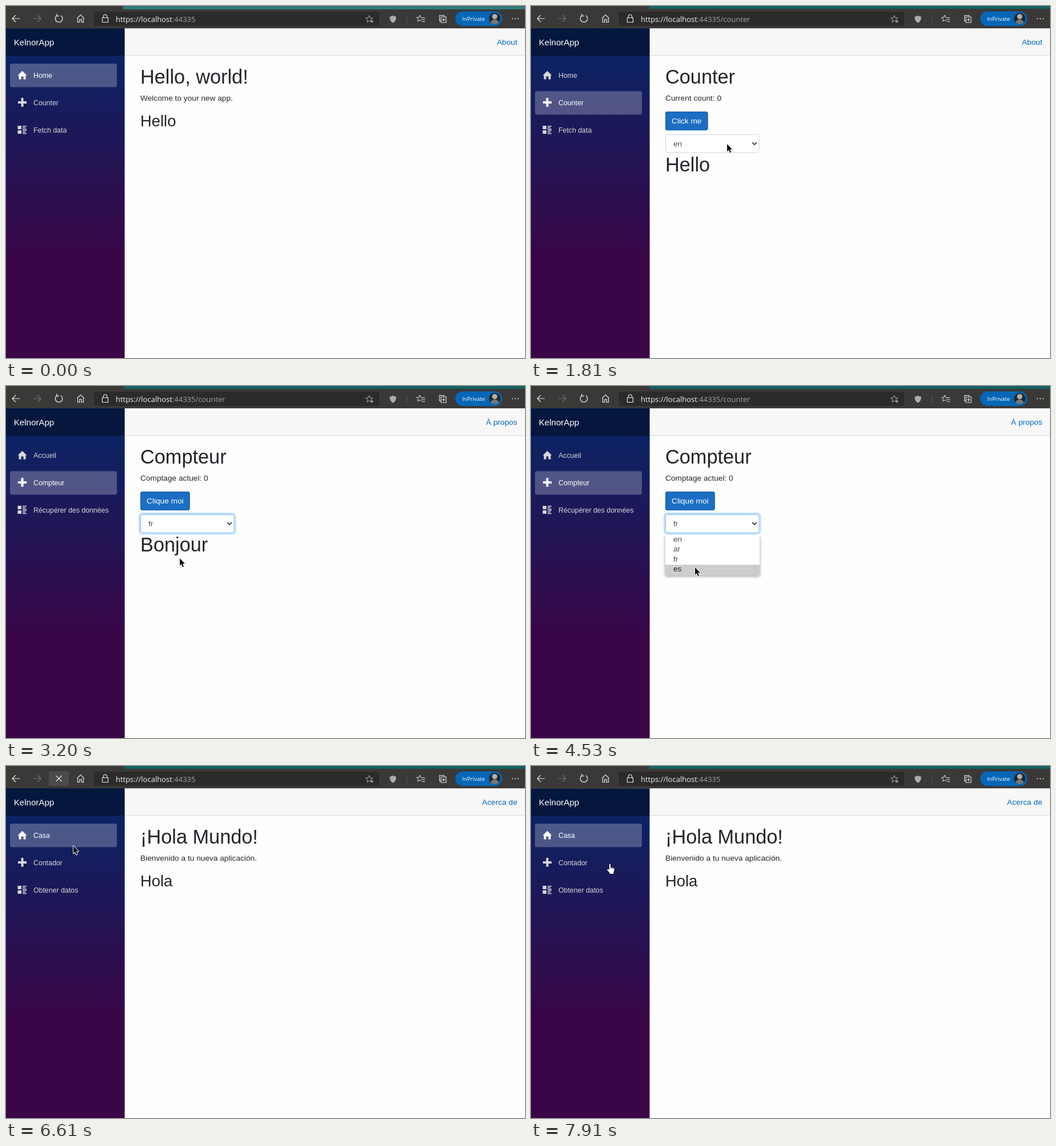
An HTML page with a canvas that plays this animation: 908x617 px, repeating every 7.99 s.

```html
<!DOCTYPE html>
<html lang="en">
<head>
<meta charset="utf-8">
<title>Language switch demo</title>
<style>
html, body { margin: 0; width: 100%; height: 100%; overflow: hidden; background: #fff; }
canvas { display: block; width: 908px; height: 617px; }
</style>
</head>
<body>
<canvas id="stage" width="908" height="617"></canvas>
<script>
const ctx = document.getElementById('stage').getContext('2d');
const LOOP = 7990;
const PAGE_FONT = '"Liberation Sans", Arial, sans-serif';
const UI_FONT = '"Open Sans", "Noto Sans", sans-serif';
const INK = '#212529';

const LANGS = {
  en: { nav: ['Home', 'Counter', 'Fetch data'], about: 'About', hello: 'Hello',
        title: 'Hello, world!', intro: 'Welcome to your new app.',
        count: 'Current count: 0', button: 'Click me' },
  fr: { nav: ['Accueil', 'Compteur', 'Récupérer des données'], about: 'À propos', hello: 'Bonjour',
        count: 'Comptage actuel: 0', button: 'Clique moi' },
  es: { nav: ['Casa', 'Contador', 'Obtener datos'], about: 'Acerca de', hello: 'Hola',
        title: '¡Hola Mundo!', intro: 'Bienvenido a tu nueva aplicación.',
        count: 'Recuento actual: 0', button: 'Haz click en mi' }
};
const OPTIONS = ['en', 'ar', 'fr', 'es'];

// Pointer stops: time, x, y
const STOPS = [
  [500, 420, 0], [1060, 110, 168], [1280, 110, 168], [1500, 225, 118], [1800, 343, 242],
  [2150, 343, 242], [2430, 318, 328], [2590, 303, 288], [2750, 303, 288], [2820, 304, 302],
  [3450, 304, 302], [3600, 305, 259], [3680, 305, 259], [3750, 305, 242], [3920, 305, 242],
  [4220, 287, 318], [4840, 287, 318], [5530, 109, 130], [5760, 109, 130], [6260, 92, 22],
  [6460, 92, 22], [6610, 118, 140], [6990, 138, 171], [LOOP, 138, 171]
];
const CLICKS = [[1130, 1280], [1880, 2040], [3050, 3200], [3830, 3970], [4450, 4530], [5570, 5680], [6330, 6440]];

const within = (t, a, b) => t >= a && t < b;

function pointerAt(t) {
  const i = Math.max(1, STOPS.findIndex(s => s[0] > t));
  const [t0, x0, y0] = STOPS[i - 1], [t1, x1, y1] = STOPS[i];
  const p = Math.min(1, Math.max(0, (t - t0) / (t1 - t0)));
  const e = p * p * (3 - 2 * p);
  return { x: x0 + (x1 - x0) * e, y: y0 + (y1 - y0) * e };
}

function rect(x, y, w, h, color, r = 0) {
  ctx.fillStyle = color;
  ctx.beginPath();
  ctx.roundRect(x, y, w, h, r);
  ctx.fill();
}

function frame(x, y, w, h, color, r = 0, width = 1) {
  ctx.strokeStyle = color;
  ctx.lineWidth = width;
  ctx.beginPath();
  ctx.roundRect(x, y, w, h, r);
  ctx.stroke();
}

function disc(x, y, r, color) {
  ctx.fillStyle = color;
  ctx.beginPath();
  ctx.arc(x, y, r, 0, 7);
  ctx.fill();
}

function text(s, x, y, size, color, font = PAGE_FONT, align = 'left') {
  ctx.font = `${size}px ${font}`;
  ctx.fillStyle = color;
  ctx.textAlign = align;
  ctx.fillText(s, x, y);
}

function line(d, color = '#e8e8e8', width = 1.2) {
  ctx.strokeStyle = color;
  ctx.lineWidth = width;
  ctx.stroke(new Path2D(d));
}

function fill(d, color) {
  ctx.fillStyle = color;
  ctx.fill(new Path2D(d));
}

function star(cx, cy, r, color) {
  ctx.beginPath();
  for (let i = 0; i < 10; i++) {
    const a = i * Math.PI / 5 - Math.PI / 2, d = i % 2 ? r * 0.45 : r;
    ctx.lineTo(cx + d * Math.cos(a), cy + d * Math.sin(a));
  }
  ctx.closePath();
  ctx.strokeStyle = color;
  ctx.lineWidth = 1;
  ctx.stroke();
}

function drawToolbar(t, counterUrl) {
  const active = t >= 500;
  rect(0, 0, 908, 39.5, '#3a3938');
  rect(active ? 207 : 205, 0, 703, active ? 5 : 6, active ? '#126263' : '#2f7c7b');

  line('M24 22H11M17 16L11 22L17 28');
  line('M48 22H61M55 16L61 22L55 28', '#757473');
  if (within(t, 6200, 6910)) rect(75, 9, 35, 26, '#4c4b4a', 2);
  if (within(t, 6450, 6910)) {
    line('M87.500 17L97.500 27M97.500 17L87.500 27');
  } else {
    line('M88.500 17.200A6.300 6.300 0 1 0 96 16.800M88.800 13.800V17.500H92.500', '#e8e8e8', 1.3);
  }
  line('M124.500 21.500L130.500 15.500L136.500 21.500M125.500 21V28.500H128.800V23.500H132.200V28.500H135.500V21');

  rect(154, 10, 499, 25, '#2c2b2a', 2);
  line('M168.500 20.500H178.500V28.500H168.500ZM170.500 20V18A3 3 0 0 1 176.500 18V20');
  text('https://localhost', 192, 27.5, 13, '#f4f4f4', UI_FONT);
  const x = 192 + ctx.measureText('https://localhost').width;
  text(':44335' + (counterUrl ? '/counter' : ''), x, 27.5, 13, '#a3a2a1', UI_FONT);
  star(635.5, 23, 6.5, '#b5b4b3');
  line('M638 27H643M640.500 24.500V29.500', '#b5b4b3', 1);

  fill('M677 16.500C679 18 680.500 18.500 682.500 18.500C683 24 681 27.500 677 29.500C673 27.500 671 24 671.500 18.500C673.500 18.500 675 18 677 16.500Z', '#adacab');
  rect(701, 16, 1, 13, '#575655');
  star(724, 22, 6, '#e8e8e8');
  rect(726.5, 19, 7, 9.5, '#3a3938');
  line('M726.500 20.500H733M727.500 24H733M728 27.500H733');
  line('M760.500 26.500H758.500V16.500H766.500V18.500M761 19H770V29H761ZM765.500 21V27M762.500 24H768.500', '#e8e8e8', 1.1);

  rect(786, 9.5, 82, 25.5, '#0567b8', 12.75);
  text('InPrivate', 798, 26, 9.7, '#fff', UI_FONT);
  ctx.save();
  ctx.beginPath();
  ctx.arc(855, 22, 10, 0, 7);
  ctx.clip();
  rect(845, 12, 20, 20, '#262626');
  disc(855, 31, 7.5, '#777');
  disc(855, 18.5, 4.6, '#b0b0b0');
  ctx.restore();
  for (let i = 0; i < 3; i++) disc(886 + i * 5, 22.3, 1, '#ededed');
}

function navIcon(i, color) {
  if (i === 0) {
    fill('M28.500 113.800L36.500 121.500H34.500V128.500H30.500V123.500H26.500V128.500H22.500V121.500H20.500Z', color);
  } else if (i === 1) {
    rect(21, 167, 15, 4, color);
    rect(26.5, 161, 4, 15.5, color);
  } else {
    for (let r = 0; r < 2; r++) {
      const y = 210 + r * 8;
      rect(20.5, y, 6.5, 6, color);
      for (let k = 0; k < 3; k++) rect(29, y + k * 2.6 - (r ? 0.4 : 0), k === 1 ? 5 : 7, 1.5, color);
    }
  }
}

function drawSidebar(lang, active, hover) {
  const g = ctx.createLinearGradient(0, 39, 0, 617);
  g.addColorStop(0, 'rgb(5,39,103)');
  g.addColorStop(0.7, '#3a0647');
  rect(0, 39.5, 207.5, 578, g);
  rect(0, 39.5, 207.5, 47.5, 'rgba(0,0,0,.4)');
  text('KelnorApp', 13.7, 69, 15.1, '#fff');
  lang.nav.forEach((label, i) => {
    const on = i === active, y = 101 + i * 48.2;
    if (on || i === hover) rect(7, y, 187, 41.3, `rgba(255,255,255,${on ? 0.25 : 0.1})`, 3.4);
    const color = on ? '#fff' : '#d7d7d7';
    navIcon(i, color);
    text(label, 48, 126 + i * 48, 12.34, color);
  });
}

function drawSelect(value, focused) {
  if (focused) frame(233.5, 223.5, 167.5, 35.5, 'rgba(0,123,255,.25)', 5, 3);
  rect(235, 225, 164.5, 32.5, '#fff', 3.4);
  frame(235.5, 225.5, 163.5, 31.5, focused ? '#80bdff' : '#ced4da', 3.4);
  text(value, 249, 245.5, 13.7, '#495057');
  line('M387.200 239.200L391 243L394.800 239.200', '#333', 1.7);
}

function drawPopup(row) {
  ctx.save();
  ctx.shadowColor = 'rgba(0,0,0,.4)';
  ctx.shadowBlur = 5;
  ctx.shadowOffsetY = 2;
  rect(235, 260.5, 165, 71, '#fff');
  ctx.restore();
  rect(235, 259.5 + row * 17.9, 165, 18, '#cdcdcd');
  OPTIONS.forEach((name, i) => text(name, 249, 272.5 + i * 17.5, 13.7, i === row ? '#1c1f22' : '#495057'));
}

function drawPage(t, lang, code, counter, pointer) {
  rect(207.5, 39.5, 701, 578, '#fefefe');
  rect(207.5, 39.5, 701, 47, '#f7f7f7');
  rect(207.5, 86.5, 701, 1, '#d6d5d5');
  text(lang.about, 894.5, 67.500, 13.7, '#0366c0', PAGE_FONT, 'right');
  if (!counter) {
    text(lang.title, 235, 136, 34.3, INK);
    text(lang.intro, 235, 165.5, 13.7, INK);
    text(lang.hello, 235, 211, 27.4, INK);
    return;
  }
  text(lang.nav[1], 235, 136, 34.3, INK);
  text(lang.count, 235, 165.5, 13.7, INK);
  ctx.font = `13.7px ${PAGE_FONT}`;
  const w = ctx.measureText(lang.button).width + 22;
  rect(235, 185, w, 33, '#1b6ec2', 3.4);
  frame(235.5, 185.5, w - 1, 32, '#1861ac', 3.4);
  text(lang.button, 246, 206, 13.7, '#fff');
  text(lang.hello, 235, 290, 34.3, INK);
  drawSelect(code, t >= 1960);
  if (within(t, 1960, 3200) || within(t, 3900, 4610)) {
    const row = pointer.y < 260 ? OPTIONS.indexOf(code) : Math.floor((pointer.y - 259.5) / 17.9);
    drawPopup(Math.min(3, row));
  }
}

function drawPointer({ x, y }, hand) {
  ctx.save();
  ctx.translate(x, y);
  ctx.lineJoin = 'round';
  if (hand) {
    const d = 'M-1.500 10V1Q0 -1 1.500 1V6L7 7.500Q8.500 8 8.300 10.500L7 15V18.500H-1V16L-5 11.500Q-5.500 9.500 -3.500 9.500Z';
    fill(d, '#fff');
    line(d, '#111', 0.9);
    line('M1.500 6V9M4 7V9.500M6.300 7.500V10', '#111', 0.7);
  } else {
    const d = 'M0 0V13L3 10.300L5 15.300L7 14.400L5 9.600H9Z';
    line(d, '#fff', 1.8);
    fill(d, '#0b0b0b');
  }
  ctx.restore();
}

function render(t) {
  const code = t < 3200 ? 'en' : t < 4610 ? 'fr' : 'es';
  const lang = LANGS[code];
  const counterUrl = within(t, 1280, 5760);
  const active = counterUrl ? 1 : 0;
  const pointer = pointerAt(t);
  const reloading = within(t, 6690, 7910);

  const overNav = t >= 500 && within(pointer.x, 7, 194) ? [0, 1, 2].find(i => within(pointer.y, 101 + i * 48.2, 142 + i * 48.2)) : undefined;
  const hover = t < 6450 ? overNav : undefined;

  drawToolbar(t, counterUrl);
  if (reloading) {
    rect(0, 39.5, 908, 578, '#fff');
  } else {
    drawPage(t, lang, code, within(t, 1210, 5680), pointer);
    drawSidebar(lang, active, hover);
  }
  if (t < 500) return;
  if (CLICKS.some(([a, b]) => within(t, a, b))) disc(pointer.x - 0.5, pointer.y - 0.5, 10.3, 'rgba(240,235,0,.55)');
  drawPointer(pointer, hover !== undefined || t >= 7910);
}

const start = performance.now();
function tick() {
  render((performance.now() - start) % LOOP);
  requestAnimationFrame(tick);
}
tick();
</script>
</body>
</html>
```
